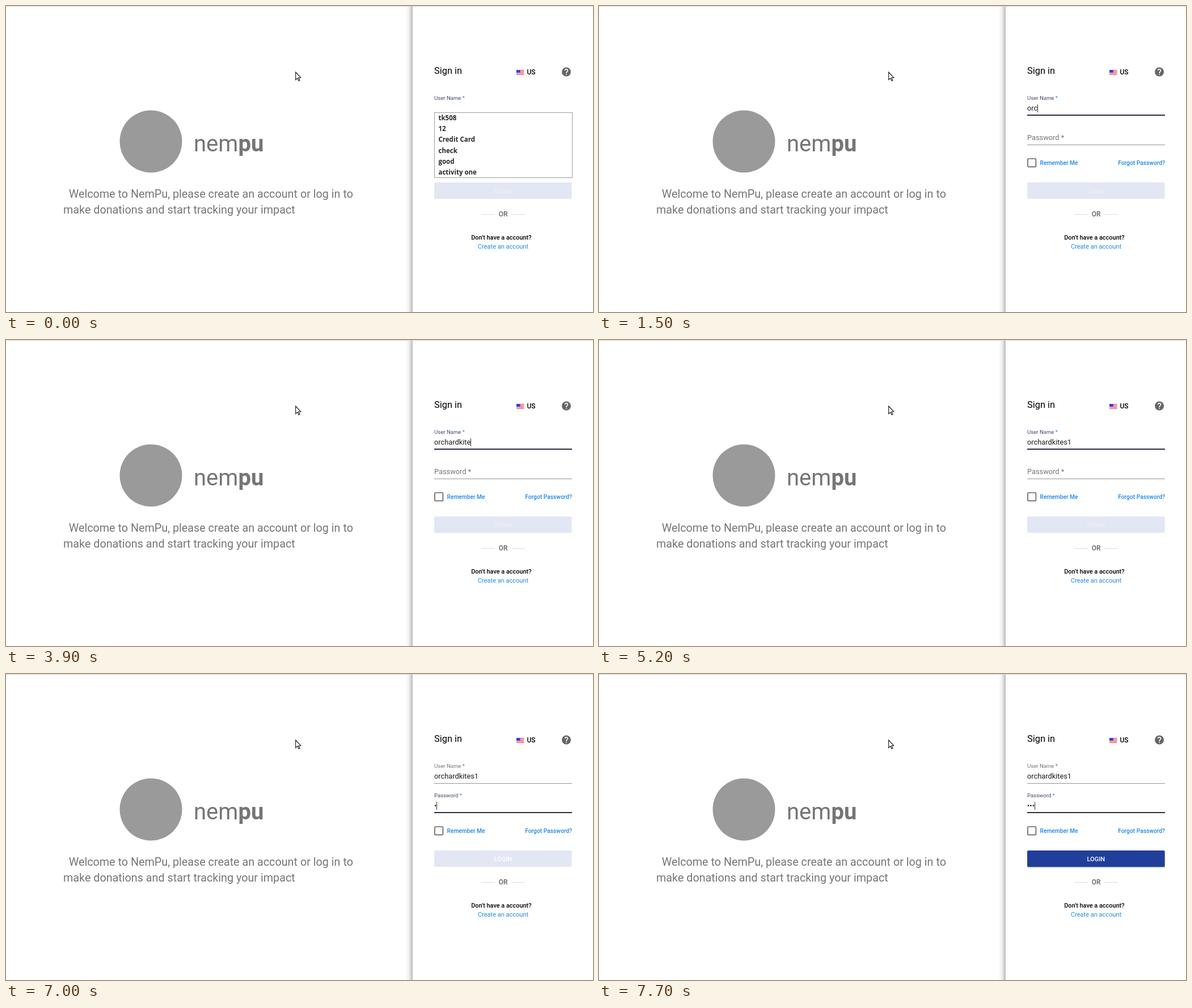
Write an HTML page that moves like this. It is 1035 px wide and 541 px high and loops after 8000 ms.

```html
<!DOCTYPE html>
<html lang="en">
<head>
<meta charset="utf-8">
<title>Sign in</title>
<style>
  html, body { margin: 0; width: 100%; height: 100%; overflow: hidden; background: #fff; }
  svg { display: block; width: 1035px; height: 541px; font-family: Roboto, Arial, sans-serif; }
  .med { font-weight: 500; }
  .grey { fill: #757575; }
  .link { fill: #1e88e5; }
  .mid { text-anchor: middle; }
  .label { font-size: 9.6px; }
  .input { font-size: 12.8px; fill: #1c1c1c; }
  .item { font: 700 11.5px "Open Sans", "Noto Sans", sans-serif; fill: #262626; }
</style>
</head>
<body>
<svg viewBox="0 0 1035 541">
  <defs>
    <linearGradient id="shade">
      <stop offset="0" stop-opacity="0"/>
      <stop offset=".5" stop-opacity=".06"/>
      <stop offset="1" stop-opacity=".27"/>
    </linearGradient>
  </defs>
  <rect width="1035" height="541" fill="#fff"/>
  <rect x="704" width="13" height="541" fill="url(#shade)"/>
  <rect width="1035" height="1" fill="#d2d2d2"/>

  <circle cx="255.5" cy="239.5" r="55" fill="#9a9a9a"/>
  <text class="grey" x="331" y="257" font-size="40">nem<tspan font-weight="700">pu</tspan></text>
  <g class="grey" font-size="19.75">
    <text x="110.7" y="339">Welcome to NemPu, please create an account or log in to</text>
    <text x="101" y="366.5">make donations and start tracking your impact</text>
  </g>
  <path d="M510.7 117v13.4l3.1-2.8 2.2 4.7 2-.9-2.2-4.7h4z" fill="#fff" stroke="#111" stroke-width="1.1"/>

  <text x="755" y="119.7" font-size="16.4">Sign in</text>
  <g id="flag"></g>
  <text class="med" x="918.5" y="121" font-size="12">US</text>
  <path transform="translate(978.4 106.9) scale(.8)" fill="#666" d="M12 2a10 10 0 1 0 0 20 10 10 0 1 0 0-20zm1 17h-2v-2h2zm2.07-7.75l-.9.92C13.45 12.9 13 13.5 13 15h-2v-.5c0-1.1.45-2.1 1.17-2.83l1.24-1.26c.37-.36.59-.86.59-1.41a2 2 0 0 0-4 0H8a4 4 0 0 1 8 0c0 .88-.36 1.68-.93 2.25z"/>

  <text class="label" id="userLabel" x="755" y="165.5">User Name <tspan>*</tspan></text>
  <text class="input" id="user" x="755" y="185"></text>
  <rect x="755" y="193" width="243" height="1" fill="#949494"/>
  <rect id="userLine" x="755" y="192" width="243" height="2" fill="#2c2c3e"/>

  <text id="passLabel" x="755">Password <tspan>*</tspan></text>
  <text class="input" id="pass" x="755" y="237"></text>
  <rect x="755" y="245" width="243" height="1" fill="#949494"/>
  <rect id="passLine" y="244" height="2" fill="#2c2c3e"/>

  <rect x="756" y="270" width="14.4" height="14.4" rx="1.2" fill="none" stroke="#666" stroke-width="1.7"/>
  <g class="link med" font-size="10.24">
    <text x="777.5" y="281">Remember Me</text>
    <text x="998" y="281" text-anchor="end">Forgot Password?</text>
  </g>

  <rect id="glow" x="755" y="313" width="243" height="30" rx="2.5" fill="#000" opacity=".16"/>
  <rect id="button" x="755" y="312" width="242.6" height="29" rx="2"/>
  <text class="med mid" id="login" x="876.3" y="330.7" font-size="11">LOGIN</text>

  <path d="M838 368.5h24M891 368.5h24" stroke="#dcdcdc"/>
  <text class="med mid" x="876.7" y="372" font-size="12" fill="#616161">OR</text>
  <text class="med mid" x="873.3" y="413" font-size="10.9">Don’t have a account?</text>
  <text class="link mid" x="876.5" y="428.6" font-size="11">Create an account</text>

  <g id="list"></g>
  <rect id="caret" width="1" fill="#333"/>
</svg>
<script>
const LOOP = 8000;
const NAME = "orchardkites1";
const HISTORY = ["tk508", "12", "Credit Card", "check", "good", "activity one"];
const NS = "http://www.w3.org/2000/svg";
const $ = id => document.getElementById(id);

function set(el, attrs) {
  for (const key in attrs) el.setAttribute(key, attrs[key]);
  return el;
}
function add(parent, tag, attrs, text = "") {
  const el = set(document.createElementNS(NS, tag), attrs);
  el.textContent = text;
  return parent.appendChild(el);
}

function drawFlag() {
  const g = $("flag");
  add(g, "rect", { x: 900, y: 113, width: 13.4, height: 8.8, fill: "#fff" });
  for (let i = 0; i < 5; i++)
    add(g, "rect", { x: 900, y: 113 + i * 1.95, width: 13.4, height: 1, fill: "#f0384a" });
  add(g, "rect", { x: 900, y: 113, width: 6.6, height: 5, fill: "#3a3ae0" });
}

function drawList(items) {
  const g = $("list");
  g.replaceChildren();
  if (!items.length) return;
  const height = items.length > 1 ? 115 : 20;
  add(g, "rect", { x: 755.5, y: 188.5, width: 243, height, fill: "#fff", stroke: "#9c9c9c" });
  items.forEach((item, i) => add(g, "text", { class: "item", x: 762.5, y: 202 + i * 19.2 }, item));
}

// Each step changes only the listed parts of the form.
const steps = [
  { at: 0, typed: 0, dots: 0, caret: false, list: HISTORY, focus: "user", float: 0, text: "#eeeef7", fill: "#e3e6f3" },
  { at: 400, caret: true },
  { at: 800, typed: 1, list: ["ok"] },
  { at: 1100, typed: 2 },
  { at: 1200, list: [] },
  ...[1500, 1700, 1900, 2200, 2600, 3200, 3600, 3800, 3900, 4500, 4600]
    .map((at, i) => ({ at, typed: i + 3 })),
  { at: 5200, caret: false },
  { at: 5500, typed: 12 },
  { at: 5900, caret: true },
  { at: 6600, typed: 13 },
  { at: 6800, focus: "pass", float: .6 },
  { at: 7000, dots: 1, float: 1, text: "#fff" },
  { at: 7200, fill: "#3850a4" },
  { at: 7400, dots: 2, fill: "#213f9a" },
  { at: 7700, dots: 3 }
];
const states = [];
for (const step of steps) states.push({ ...states[states.length - 1], ...step });

function paintLabel(el, focused) {
  el.setAttribute("fill", focused ? "#46466e" : "#757575");
  el.querySelector("tspan").setAttribute("fill", focused ? "#1e88e5" : "#757575");
}

function render(s) {
  const onUser = s.focus === "user";
  $("user").textContent = NAME.slice(0, s.typed);
  $("pass").textContent = "•".repeat(s.dots);
  paintLabel($("userLabel"), onUser);
  paintLabel($("passLabel"), !onUser);
  set($("passLabel"), { y: 237 - 19.5 * s.float, "font-size": 12.8 - 3.2 * s.float });
  set($("userLine"), { opacity: onUser ? 1 : 0 });
  set($("passLine"), { x: 876.5 - 121.5 * s.float, width: 243 * s.float });

  const input = $(s.focus);
  const width = input.textContent ? input.getComputedTextLength() : 0;
  set($("caret"), {
    x: Math.round(755 + width), y: onUser ? 174 : 226,
    height: 14, opacity: s.caret ? 1 : 0
  });

  const active = s.fill !== states[0].fill;
  set($("glow"), { opacity: active ? .16 : 0 });
  set($("button"), { fill: s.fill });
  set($("login"), { fill: s.text });
  drawList(s.list);
}

let shown = null;
function tick() {
  const t = performance.now() % LOOP;
  const state = states.findLast(s => s.at <= t);
  if (state !== shown) render(shown = state);
  requestAnimationFrame(tick);
}
drawFlag();
tick();
</script>
</body>
</html>
```
